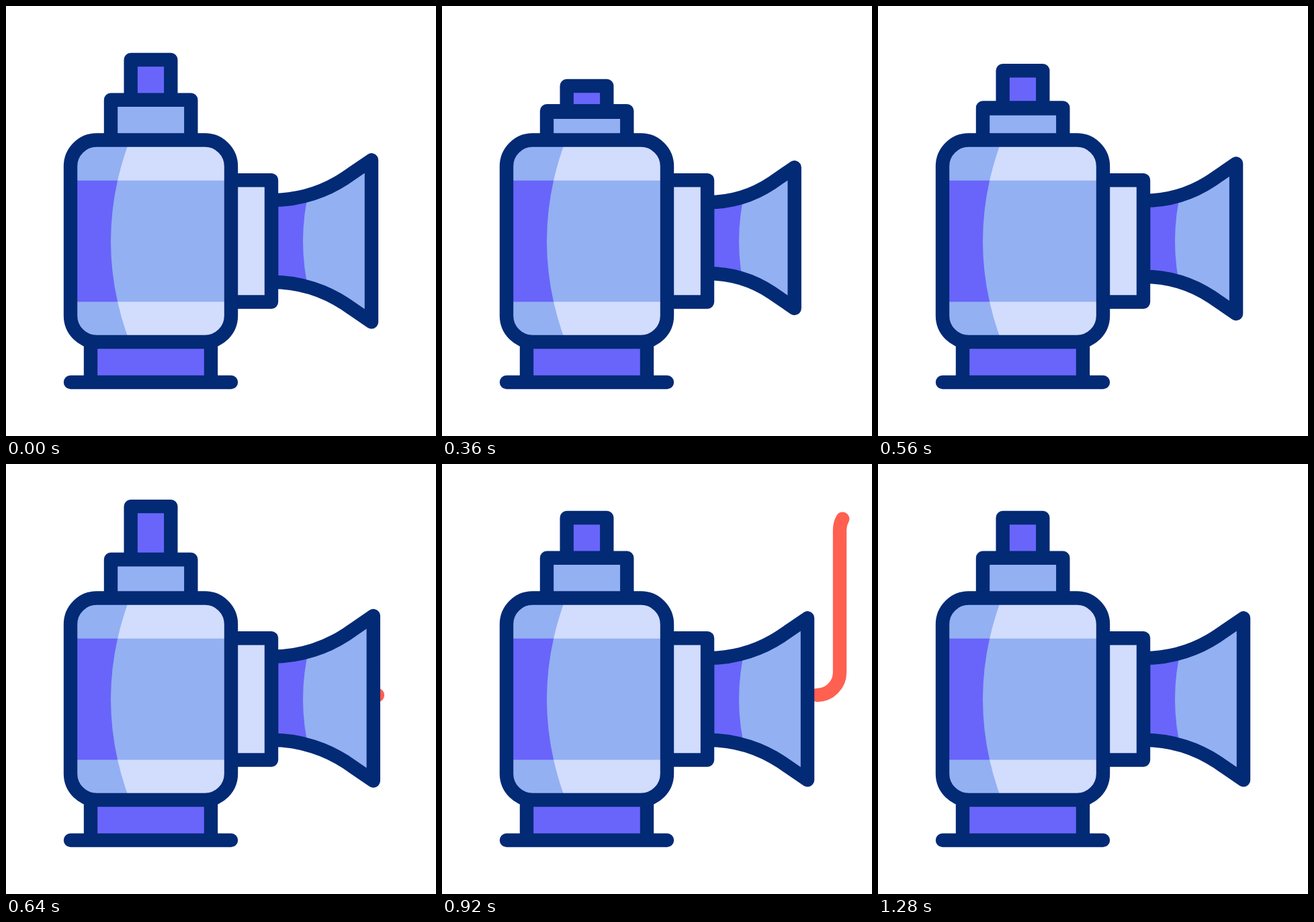
Recreate the animation shown at these times as an HTML page. Size 640x640 px, loop 1.48 s.

```html
<!DOCTYPE html>
<html lang="en">
<head>
<meta charset="utf-8">
<title>Air horn</title>
<style>
  html, body { margin: 0; width: 100%; height: 100%; overflow: hidden; background: #fff; }
  svg { display: block; width: 100vw; height: 100vh; }
  .line { fill: none; stroke: #032a75; stroke-width: 20.4; stroke-linecap: round; stroke-linejoin: round; }
  .deep { fill: #6965fa; }
  .mid { fill: #93b0f2; }
  .pale { fill: #d2dcfd; }
  #jet { fill: none; stroke-width: 20.4; stroke-linecap: round; }
</style>
</head>
<body>
<svg viewBox="0 0 640 640">
  <defs>
    <clipPath id="hornClip"><path class="horn"/></clipPath>
    <clipPath id="bodyClip"><rect x="96" y="199.5" width="239" height="300.5" rx="39"/></clipPath>
  </defs>

  <path id="jet" d="M553 344H558A34 34 0 0 0 592 310V98A34 34 0 0 1 626 64H644.5"/>

  <path class="horn mid"/>
  <path class="deep" clip-path="url(#hornClip)" d="M380 270H452Q432 350 452 430H380Z"/>
  <path class="horn line"/>

  <path class="pale" d="M335 259.3H395V440.5H335Z"/>
  <path class="line" d="M335 259.3H395V440.5H335"/>

  <path id="capFill" class="deep"/>
  <path id="capLine" class="line"/>
  <path id="neckFill" class="mid"/>
  <path id="neckLine" class="line"/>

  <path class="deep" d="M126 500H305V560H126Z"/>
  <path class="line" d="M126 500V560M305 500V560M96 560H335"/>

  <g clip-path="url(#bodyClip)">
    <path class="pale" d="M96 199H336V501H96Z"/>
    <path class="mid" d="M96 259.7H336V440.3H96Z"/>
    <path class="mid" d="M96 200H184Q128 350 184 500H96Z"/>
    <path class="deep" d="M96 259.7H166.1Q145.9 350 166.1 440.3H96Z"/>
  </g>
  <rect class="line" x="96" y="199.5" width="239" height="300.5" rx="39"/>
</svg>
<script>
const LOOP = 1480, STEP = 40;
const PRESS = 100, HELD = 480, PEAK = 660;
const $ = id => document.getElementById(id);
const horns = document.querySelectorAll('.horn');
const jet = $('jet');
const jetLength = jet.getTotalLength();

const ramp = (t, a, b) => Math.min(1, Math.max(0, (t - a) / (b - a)));
const mix = (a, b, p) => a + (b - a) * p;

// rest -> squeezed -> overshoot -> rest
function spring(t, low, high, end) {
  if (t < HELD) return low * (1 - Math.pow(1 - ramp(t, PRESS, HELD), 1.34));
  if (t < PEAK) return mix(low, high, ramp(t, HELD, PEAK));
  return high * (1 - ramp(t, PEAK, end));
}

function hornPath(scale, shift) {
  const pt = (x, y) =>
    (395 + (x - 395) * scale).toFixed(2) + ' ' + (313 + (y - 313) * scale + shift).toFixed(2);
  return `M${pt(395, 289)}C${pt(440, 289)} ${pt(478, 274)} ${pt(505, 256)}L${pt(544, 229.3)}` +
    `V${pt(544, 470.4).split(' ')[1]}L${pt(505, 443.7)}` +
    `C${pt(478, 425.7)} ${pt(440, 410.7)} ${pt(395, 410.7)}Z`;
}

function drawJet(t) {
  const head = jetLength * ramp(t, 653, 971);
  const tail = Math.min(jetLength - 0.02, jetLength * ramp(t, 915, 1227));
  jet.style.display = t >= 640 ? '' : 'none';
  jet.setAttribute('stroke', t >= 1280 ? '#efeeff' : '#ff6050');
  jet.setAttribute('stroke-dasharray', `${Math.max(0.01, head - tail)} 2000`);
  jet.setAttribute('stroke-dashoffset', -tail);
}

function draw(t) {
  const cap = 80 + spring(t, 49.5, -25.2, 815);
  const drop = spring(t, 21, 0, PEAK);
  const neck = 139.7 + drop;
  const under = neck + drop * 0.1;

  $('capFill').setAttribute('d', `M185.7 ${cap}H245.3V${neck}H185.7Z`);
  $('capLine').setAttribute('d', `M185.7 ${neck}V${cap}H245.3V${neck}`);
  $('neckFill').setAttribute('d', `M156 ${neck}H275.3V199H156Z`);
  $('neckLine').setAttribute('d', `M156 199V${neck}H275.3V199M156 ${under}H275.3`);

  const shift = t < HELD ? 0 : spring(t, 0, -2, 920);
  const d = hornPath(1 + spring(t, -0.165, 0.042, 920), shift);
  horns.forEach(h => h.setAttribute('d', d));
  drawJet(t);
}

const start = performance.now();
function tick() {
  const t = (performance.now() - start) % LOOP;
  draw(Math.floor(t / STEP) * STEP);
  requestAnimationFrame(tick);
}
tick();
</script>
</body>
</html>
```
